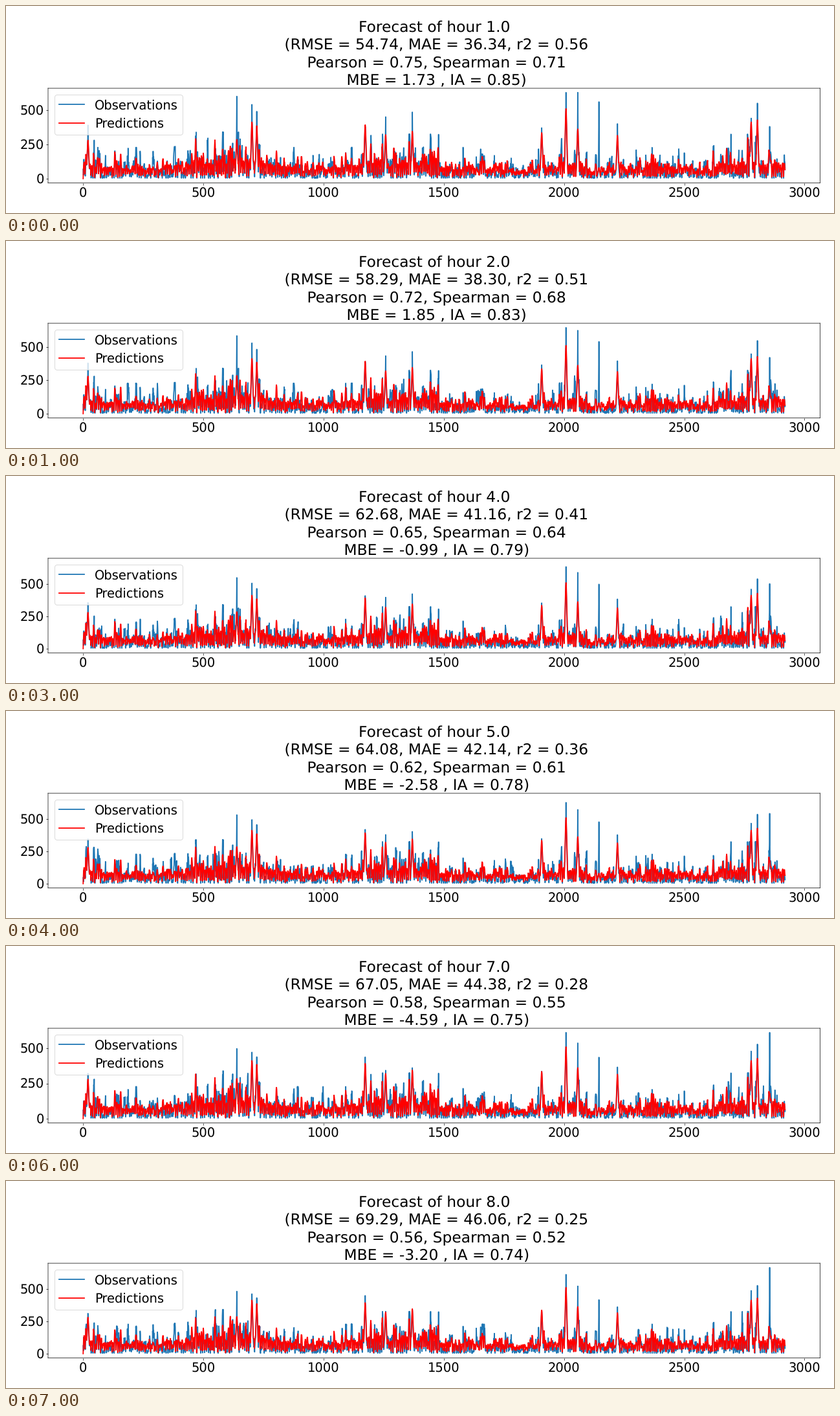
A matplotlib script for the animation above (8 s loop, 1280 px wide and 320 px high).

```python
import numpy as np
import matplotlib.pyplot as plt
from matplotlib.animation import FuncAnimation

plt.rcParams.update({"font.family": "DejaVu Sans", "font.size": 22,
                     "text.hinting": "none", "xtick.major.pad": 4.5})

W, H = 1280, 320
LEFT, RIGHT, TOP, BOTTOM = 65, 1258.6, 127.1, 273.6
HOURS = 8
DAYS, DAY = 365, 8
N = DAYS * DAY
t = np.arange(N)

# Scores at the hours in KNOWN; the others are interpolated.
KNOWN = (1, 2, 4, 6, 7, 8)
SCORES = {
    "rmse": (54.74, 58.29, 62.68, 65.47, 67.05, 69.29),
    "mae": (36.34, 38.30, 41.16, 43.13, 44.38, 46.06),
    "r2": (0.56, 0.51, 0.41, 0.32, 0.28, 0.25),
    "pearson": (0.75, 0.72, 0.65, 0.60, 0.58, 0.56),
    "spearman": (0.71, 0.68, 0.64, 0.58, 0.55, 0.52),
    "mbe": (1.73, 1.85, -0.99, -4.18, -4.59, -3.20),
    "ia": (0.85, 0.83, 0.79, 0.76, 0.75, 0.74),
    "top": (628, 645, 666, 666, 612, 664),
}

# Strongest events: sample, predicted, observed at first and last hour
EVENTS = [
    (20, 280, 390, 310), (639, 285, 600, 480), (702, 412, 540, 460),
    (722, 385, 490, 430), (1173, 392, 380, 447), (1258, 320, 450, 325),
    (1369, 345, 485, 340), (1907, 335, 370, 330), (2008, 510, 650, 610),
    (2057, 362, 640, 520), (2145, 80, 560, 415), (2222, 315, 400, 360),
    (2778, 412, 440, 485), (2804, 428, 550, 525), (2855, 180, 380, 664),
]


def bumps(peaks, width):
    out = np.zeros(N)
    for pos, height in peaks:
        out = np.maximum(out, height * np.exp(-((t - pos) / width) ** 2))
    return out


def daily(values):
    return np.repeat(values, DAY)


def season(start, end, gain):
    """A smooth step up and down between two samples."""
    return gain / (1 + np.exp((start - t) / 12)) / (1 + np.exp((t - end) / 12))


rng = np.random.default_rng(7)
level = (125 + season(-50, 70, 40) + season(415, 800, 75)
         + season(1170, 1520, 65) + season(1780, 1850, -75)
         + season(1970, 2095, 60) + season(2110, 2180, -45)
         + season(2530, 2590, -60) + season(2640, 2900, 65))
u = rng.random(DAYS)
low = daily(rng.uniform(12, 50, DAYS))
peak = level * daily(0.45 + 0.5 * u + 0.6 * u ** 8)
wave = np.abs(np.sin(np.pi * t / DAY))
base = low + np.maximum(peak - low, 10) * wave + rng.normal(0, 8, N)
base = np.maximum(base, 8)
events = bumps([e[:2] for e in EVENTS], 5)
day_noise = rng.normal(size=DAYS)
fine_noise = rng.normal(size=N)


def series(hour):
    """Observed and predicted values for one forecast hour."""
    own = np.random.default_rng(100 + hour)
    pred = base * daily(1 + 0.04 * own.normal(size=DAYS))
    pred = np.maximum(pred, events)
    pred[0] = 0

    mixed = daily(0.85 * day_noise + 0.5 * own.normal(size=DAYS))
    obs = np.roll(base, 1) * np.exp(0.38 * mixed + 0.2 * fine_noise) - 18
    obs = np.minimum(obs, 1.5 * level + 40)
    obs = np.maximum(obs, 0.9 * events)
    share = (hour - 1) / (HOURS - 1)
    observed = [(pos, a + (b - a) * share) for pos, _, a, b in EVENTS]
    obs = np.maximum(obs, bumps(observed, 1.3))
    return np.clip(obs, 4, score("top", hour)), pred


def score(name, hour):
    return float(np.interp(hour, KNOWN, SCORES[name]))


def title_lines(hour):
    s = {name: score(name, hour) for name in SCORES}
    return (f"Forecast of hour {hour:.1f}",
            f" (RMSE = {s['rmse']:.2f}, MAE = {s['mae']:.2f}, r2 = {s['r2']:.2f}",
            f" Pearson = {s['pearson']:.2f}, Spearman = {s['spearman']:.2f}",
            f" MBE = {s['mbe']:.2f} , IA = {s['ia']:.2f})")


fig = plt.figure(figsize=(20, 5), dpi=64, facecolor="white")
ax = fig.add_axes([LEFT / W, 1 - BOTTOM / H,
                   (RIGHT - LEFT) / W, (BOTTOM - TOP) / H])
obs_line, = ax.plot(t, np.zeros(N), color="tab:blue", lw=2,
                    label="Observations")
pred_line, = ax.plot(t, np.zeros(N), color="red", lw=2, label="Predictions")
ax.set_xlim(-0.05 * (N - 1), 1.05 * (N - 1))
ax.set_xticks(range(0, 3001, 500))
ax.set_yticks([0, 250, 500])
for spine in ax.spines.values():
    spine.set_snap(False)
ax.legend(loc="upper left", borderpad=0.37, labelspacing=0.45)

titles = [fig.text((LEFT + RIGHT) / 2 / W, 1 - y / H, "", fontsize=26.35,
                   ha="center", va="baseline")
          for y in (40, 67, 94, 122)]


def draw(frame):
    hour = frame + 1
    obs, pred = series(hour)
    obs_line.set_ydata(obs)
    pred_line.set_ydata(pred)
    top = score("top", hour)
    ax.set_ylim(-0.05 * top, 1.05 * top)
    for label, text in zip(titles, title_lines(hour)):
        label.set_text(text)
    return [obs_line, pred_line, *titles]


anim = FuncAnimation(fig, draw, frames=HOURS, interval=1000, repeat=True,
                     repeat_delay=0, init_func=lambda: draw(0), blit=False)
plt.show()
```
